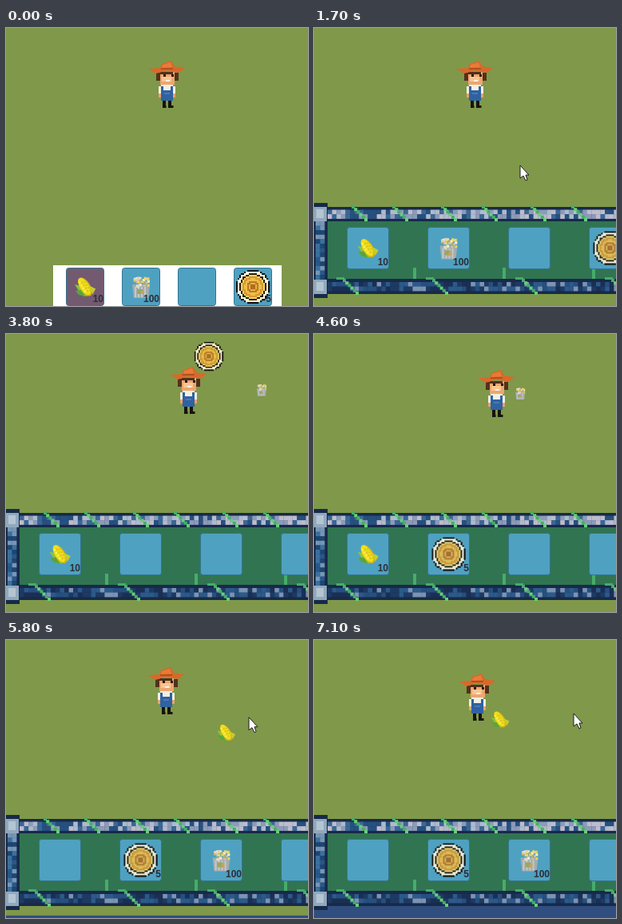
Animation, 378 px wide and 348 px high, one loop 7.2 s. Source, as an HTML page with a canvas:

```html
<!DOCTYPE html>
<html lang="en">
<head>
<meta charset="utf-8">
<title>Farm inventory</title>
<style>
html, body { margin: 0; width: 100%; height: 100%; overflow: hidden; background: #80984a; }
canvas { display: block; }
</style>
</head>
<body>
<canvas id="stage" width="378" height="348"></canvas>
<script>
const ctx = document.getElementById('stage').getContext('2d');
const LOOP = 7200, STEP = 100;
const SPEED = 0.1, CAMERA_LAG = 330;
const SLOT_BLUE = '#4fa1c1', NAVY = '#172a49';

// Key presses: start, end, direction
const walks = [[3200, 3800, 1, 0], [3800, 4100, 0.7, -0.7], [4100, 4400, 0.7, 0.7], [4400, 4800, 1, 0],
  [4800, 5000, 0, 1], [5050, 5250, -1, 0], [5700, 5900, 0, -1], [5950, 6300, 1, 1], [6300, 6420, 1, 0]];

// Pointer stops: time, x, y
const stops = [[1700, 258, 172], [2100, 168, 275], [2400, 353, 70], [2700, 360, 258], [3100, 279, 11],
  [3300, 270, -30], [4800, 400, 150], [5290, 73, 273], [5700, 283, 111], [5900, 325, 92]];

// Each item is dragged from its slot, dropped in the world and perhaps picked up again
const loot = [
  { name: 'corn', count: 10, slot: 0, grab: 5290, drop: 5700, x: 399, y: 133, size: 0.87, grip: [-6, 2] },
  { name: 'bucket', count: 100, slot: 1, grab: 2100, drop: 2400, x: 353, y: 70, size: 0.55, grip: [0, 0], pickup: 4700, newSlot: 2 },
  { name: 'coin', count: 5, slot: 3, grab: 2700, drop: 3100, x: 287, y: 28, size: 0.86, grip: [8, 17], pickup: 4100, newSlot: 1 }
];

// The farmer walks at constant speed; the camera follows with exponential lag
function follow(t) {
  const world = [0, 0], camera = [0, 0], dt = 10;
  for (let time = 3200; time < t; time += dt) {
    const key = walks.find(([start, end]) => time >= start && time < end) || [0, 0, 0, 0];
    for (const axis of [0, 1]) {
      world[axis] += key[2 + axis] * SPEED * dt;
      camera[axis] += (world[axis] - camera[axis]) * dt / CAMERA_LAG;
    }
  }
  return { world, camera };
}

function pointer(t) {
  const i = stops.findIndex(s => s[0] > t);
  if (i < 1) return stops[i < 0 ? stops.length - 1 : 0].slice(1);
  const [t0, x0, y0] = stops[i - 1], [t1, x1, y1] = stops[i], p = (t - t0) / (t1 - t0);
  return [x0 + (x1 - x0) * p, y0 + (y1 - y0) * p * (2 - p)];
}

function random(n) {
  const v = Math.sin(n * 127.1 + 11.7) * 43758.5453;
  return v - Math.floor(v);
}

function rect(color, x, y, w, h) {
  ctx.fillStyle = color;
  ctx.fillRect(x, y, w, h);
}

function poly(color, ...p) {
  ctx.fillStyle = color;
  ctx.beginPath();
  for (let i = 0; i < p.length; i += 2) ctx.lineTo(p[i], p[i + 1]);
  ctx.closePath();
  ctx.fill();
}

function oval(color, rx, ry, x = 0, y = 0) {
  ctx.fillStyle = color;
  ctx.beginPath();
  ctx.ellipse(x, y, rx, ry, 0, 0, 7);
  ctx.fill();
}

function placed(x, y, scale, draw) {
  ctx.save();
  ctx.translate(x, y);
  ctx.scale(scale, scale);
  draw();
  ctx.restore();
}

const art = {
  corn() {
    poly('#8cc63c', -13, -3, -6, -1, 3, 12, -4, 11);
    poly('#5aa53a', -12, 5, -5, 4, 0, 12, -8, 10);
    ctx.rotate(-0.55);
    oval('#cfb416', 6.5, 13);
    oval('#f0de1c', 5.5, 12, -0.5, -1);
    for (let i = 0; i < 12; i++) rect(i % 3 ? '#d8c018' : '#fff36a', -4 + i % 3 * 3, -9 + i * 1.4, 2, 2);
    poly('#c9c92c', 3, 13, 5, 1, 10, 9);
  },
  bucket() {
    poly('#a4acae', -11, -3, 11, -3, 9, 14, -9, 14);
    for (let x = -8; x < 8; x += 4) rect('#c3c8c8', x, 0, 2, 13);
    rect('#98a860', -5, 3, 7, 6);
    rect('#d0a05c', 0, 5, 4, 4);
    for (let i = 0; i < 40; i++)
      rect(['#ecd95c', '#f3eccb', '#b5a878', '#d9cfc6'][i % 4], -11 + random(i) * 19, -13 + random(i + 40) * 11, 3, 3);
  },
  coin() {
    const bands = [['#b06c20', 3], ['#e9b043', 5], ['#bd7a26', 8], ['#edbe4a', 10.5], ['#d9982c', 13],
      ['#f3cf62', 15], ['#2a2112', 17], ['#fff6dc', 20], ['#15130f', 21.5]];
    const cell = 2;
    for (let y = -21; y < 21; y += cell)
      for (let x = -21; x < 21; x += cell) {
        const band = bands.find(b => Math.hypot(x + 1, y + 1) < b[1]);
        if (band) rect(band[0], x, y, cell + 0.2, cell + 0.2);
      }
  }
};

function farmer(x, y, stride) {
  placed(Math.round(x), Math.round(y), 1, () => {
    for (const side of [-1, 1]) {
      const spread = side * (3.5 + stride);
      rect('#17140f', spread - 1.5, 20, 4, 10);
      rect('#17140f', spread + side, 27, 4, 3);
      rect('#f3efe3', side * 8 - 2, 3, 5, 9);
      rect('#e9a36a', side * 9 - 1, 12, 3, 5);
      rect('#54301c', side * 11 - 2, -14, 6, 10);
    }
    rect('#f3efe3', -7, 1, 15, 7);
    rect('#2f62a3', -7, 8, 15, 13);
    rect('#2f62a3', -7, 3, 3, 6);
    rect('#2f62a3', 5, 3, 3, 6);
    rect('#4a79b4', -3, 11, 7, 2);
    rect('#eda66f', -8, -15, 18, 16);
    rect('#f8c692', -6, -9, 12, 6);
    rect('#54301c', -8, -15, 16, 3);
    rect('#2b1812', -4, -12, 3, 3);
    rect('#2b1812', 6, -12, 3, 3);
    rect('#fff1df', -1, -5, 5, 2);
    poly('#d8692b', -23, -19, -8, -20, -6, -25, 6, -29, 10, -22, 23, -20, 15, -14, 0, -17, -13, -13);
    poly('#e97b36', -5, -24, 5, -27, 7, -21, -6, -20);
    rect('#b64e20', -7, -20, 15, 2);
  });
}

function slot(x, y, size, color, item) {
  ctx.fillStyle = color;
  ctx.strokeStyle = '#34758f';
  ctx.lineWidth = 1;
  ctx.beginPath();
  ctx.roundRect(x + 0.5, y + 0.5, size - 1, size - 1, 3);
  ctx.fill();
  ctx.stroke();
  if (!item) return;
  placed(x + size / 2, y + size / 2, 1, art[item.name]);
  ctx.fillStyle = '#292f38';
  ctx.font = 'bold 12px "Liberation Sans", sans-serif';
  ctx.textAlign = 'right';
  ctx.fillText(item.count, x + size - 1, y + size - 5);
}

const stockAt = (i, t) => loot.find(l => t < l.grab ? l.slot === i : t >= l.pickup && l.newSlot === i);

function hotbar(t) {
  const selected = 3 - Math.abs(3 - Math.floor(t / 300));
  rect('#fff', 59, 297, 286, 51);
  for (let i = 0; i < 4; i++)
    slot(75 + i * 70, 300, 48, i === selected ? '#735a70' : SLOT_BLUE, stockAt(i, t));
}

function stones(x, y, cols, rows, colors, seed) {
  for (let i = 0; i < cols * rows; i++)
    rect(colors[Math.floor(random(i + seed) * colors.length)], x + i % cols * 5.6, y + Math.floor(i / cols) * 5.6, 5.8, 5.8);
}

function vine(x, y) {
  for (let i = 0; i < 6; i++) rect(i % 2 ? '#68cf78' : '#45ad68', x + i * 3.2, y + i * 3.2, 4, 4);
}

function panelFrame() {
  rect('#317451', 15, 240, 363, 77);
  rect(NAVY, 0, 219, 17, 119);
  stones(2, 242, 2, 13, ['#28588a', '#3b719e', '#1e4672', '#7796b5'], 7);
  rect(NAVY, 17, 224, 361, 18);
  stones(17, 227.5, 65, 2, ['#bfbccd', '#8c9bb8', '#3a6796', '#26507f', '#aebbcd'], 80);
  rect(NAVY, 17, 314, 361, 19);
  stones(17, 318, 65, 2, ['#1d3a63', '#25507f', '#1b2f54', '#2c5a8a', '#7d93b4'], 260);
  for (const y of [224, 315]) {
    rect('#91a9be', 0, y, 16, 18);
    rect('#b4c5d2', 3, y + 3, 9, 11);
  }
  for (let x = 0; x < 378; x += 112) {
    vine(x + 47, 222);
    vine(x + 98, 222);
    vine(x + 36, 314);
    rect('#45ad68', x + 28, 312, 10, 3);
    rect('#45ad68', x + 124, 300, 4, 14);
  }
}

function inventory(t) {
  panelFrame();
  for (let i = 0; i < 4; i++) {
    const pressed = loot.some(l => l.slot === i && t >= l.grab && t < l.grab + 200);
    slot(41 + i * 101, 249, 53, pressed ? '#407ea2' : SLOT_BLUE, stockAt(i, t));
  }
}

function drawLoot(t, camera) {
  const [px, py] = pointer(t);
  for (const l of loot) {
    if (t < l.grab || t >= l.pickup) continue;
    const held = t < l.drop;
    const x = held ? px + l.grip[0] : l.x - camera[0];
    const y = held ? py + l.grip[1] : l.y - camera[1];
    placed(x, y, l.size, art[l.name]);
  }
}

function drawPointer(t) {
  if (t >= 3300 && t < 4800) return;
  placed(...pointer(t), 1, () => {
    ctx.strokeStyle = '#1b1b1b';
    ctx.lineWidth = 1;
    poly('#fff', 0, 0, 0, 16, 4, 13, 7, 19, 9, 18, 7, 12, 11, 12);
    ctx.stroke();
  });
}

function draw(now) {
  const t = Math.floor(now % LOOP / STEP) * STEP;
  const { world, camera } = follow(t);
  const walking = walks.some(([start, end]) => t >= start && t <= end);
  rect('#80984a', 0, 0, 378, 348);
  rect('#304f80', 0, 362 - camera[1], 378, 100);
  farmer(201 + world[0] - camera[0], 70 + world[1] - camera[1], walking ? t / STEP % 2 * 2 : 0);
  if (t < 1700) {
    hotbar(t);
  } else {
    inventory(t);
    drawLoot(t, camera);
    drawPointer(t);
  }
  requestAnimationFrame(draw);
}
requestAnimationFrame(draw);
</script>
</body>
</html>
```
